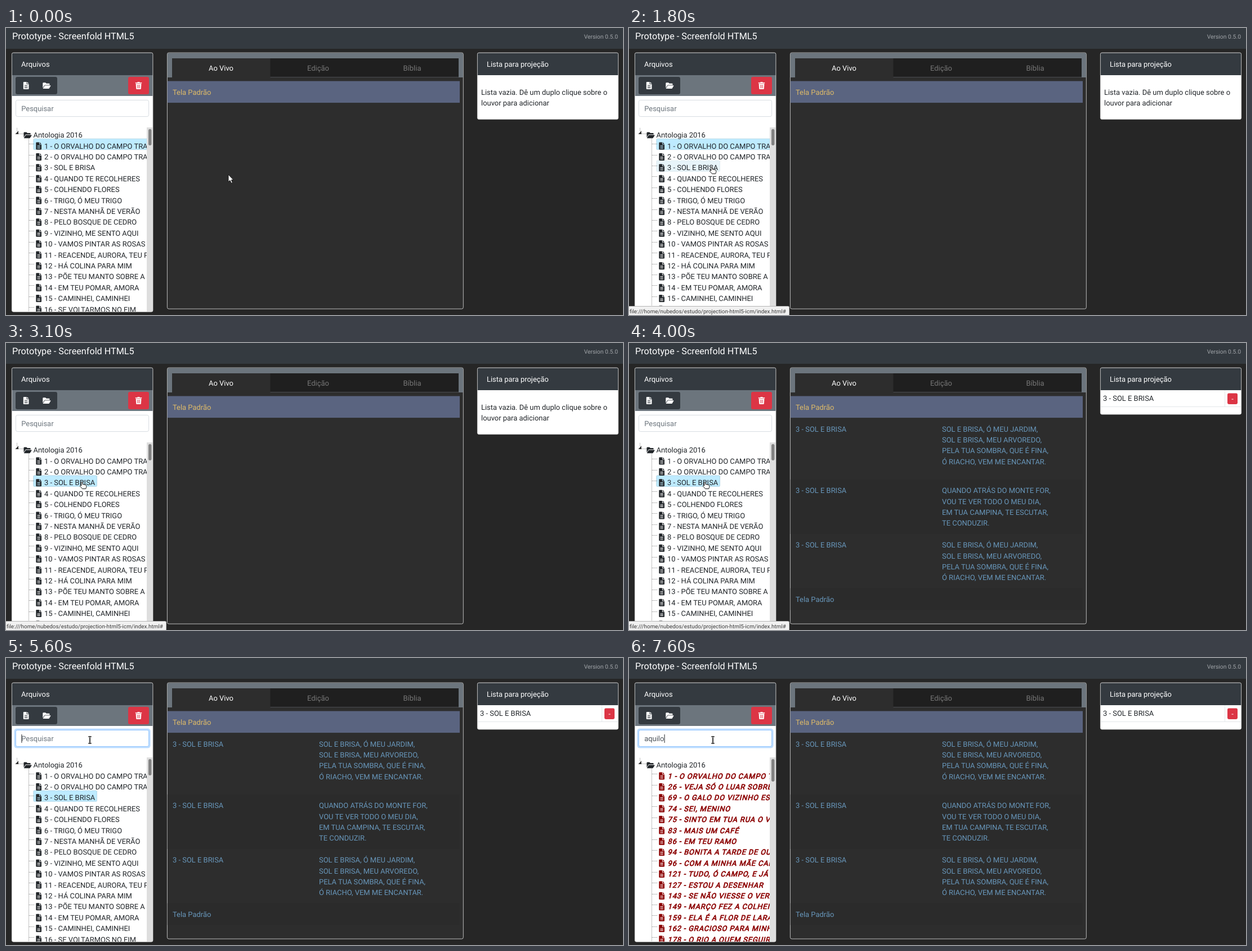
Recreate the animation shown at these times as an HTML page. Size 1096 by 511 pixels, loop 8 s.

```html
<!DOCTYPE html>
<html lang="pt">
<head>
<meta charset="utf-8">
<title>Prototype</title>
<style>
  html, body { margin: 0; width: 100%; height: 100%; overflow: hidden; background: #262626; }
  svg { display: block; width: 1096px; height: 511px; font: 12.95px Roboto, sans-serif; }
  text { white-space: pre; text-rendering: geometricPrecision; }
  .found { fill: #8b0000; }
  /* Emboldened, slanted regular face */
  .found text {
    letter-spacing: .81px; stroke: #8b0000; stroke-width: .7px;
    transform: translateX(.4px) skewX(-14deg); transform-box: fill-box; transform-origin: 0 79%;
  }
</style>
</head>
<body>
<svg id="stage" viewBox="0 0 1096 511"></svg>
<script>
const LOOP = 8000, STEP = 100;
const ROW = 19.4, TOP = 197.2, RIGHT = 250;
const INK = '#212529', DARK = '#343a40', GREY = '#6c757d', RED = '#dc3545';
const SONG = '3 - SOL E BRISA';

const SONGS = [
  '1 - O ORVALHO DO CAMPO TRAZ PAZ', '2 - O ORVALHO DO CAMPO TRAZ LUZ', SONG,
  '4 - QUANDO TE RECOLHERES', '5 - COLHENDO FLORES', '6 - TRIGO, Ó MEU TRIGO',
  '7 - NESTA MANHÃ DE VERÃO', '8 - PELO BOSQUE DE CEDRO', '9 - VIZINHO, ME SENTO AQUI',
  '10 - VAMOS PINTAR AS ROSAS', '11 - REACENDE, AURORA, TEU PORTAL', '12 - HÁ COLINA PARA MIM',
  '13 - PÕE TEU MANTO SOBRE A MESA', '14 - EM TEU POMAR, AMORA', '15 - CAMINHEI, CAMINHEI',
  '16 - SE VOLTARMOS NO FIM'
];
const FOUND = [
  '1 - O ORVALHO DO CAMPO TRAZ PAZ', '26 - VEJA SÓ O LUAR SOBRE O RIO', '69 - O GALO DO VIZINHO ESTÁ ALI',
  '74 - SEI, MENINO', '75 - SINTO EM TUA RUA O VENTO', '83 - MAIS UM CAFÉ', '86 - EM TEU RAMO',
  '94 - BONITA A TARDE DE OUTONO', '96 - COM A MINHA MÃE CANTEI', '121 - TUDO, Ó CAMPO, E JÁ',
  '127 - ESTOU A DESENHAR', '143 - SE NÃO VIESSE O VERÃO', '149 - MARÇO FEZ A COLHEITA',
  '159 - ELA É A FLOR DE LARANJEIRA', '162 - GRACIOSO PARA MINHA AVÓ', '178 - O RIO A QUEM SEGUIREI'
];
const CHORUS = ['SOL E BRISA, Ó MEU JARDIM,', 'SOL E BRISA, MEU ARVOREDO,',
  'PELA TUA SOMBRA, QUE É FINA,', 'Ó RIACHO, VEM ME ENCANTAR.'];
const VERSE = ['QUANDO ATRÁS DO MONTE FOR,', 'VOU TE VER TODO O MEU DIA,',
  'EM TUA CAMPINA, TE ESCUTAR,', 'TE CONDUZIR.'];

// Pointer path: time, x, y
const PATH = [
  [700, 395, 261], [1200, 272, 237], [1600, 160, 231], [1800, 147, 247],
  [2600, 147, 247], [3000, 135, 247], [4500, 135, 247], [4900, 150, 124],
  [5100, 150, 142], [5300, 150, 142], [5600, 149, 146]
];
const TYPED = [[0, ''], [6500, 'a'], [6700, 'aq'], [7000, 'aqui'], [7600, 'aquilo']];
const SELECT = 2900, ADDED = 4000, FOCUS = 5400, FILTER = 7600;

const rect = (x, y, w, h, fill, more = '') =>
  `<rect x="${x}" y="${y}" width="${w}" height="${h}" fill="${fill}" ${more}/>`;
// Text placed by the middle of its capitals
const text = (x, mid, str, fill = INK, size = 12.95, more = '') =>
  `<text x="${x}" y="${(mid + size * .356).toFixed(2)}" ${fill && `fill="${fill}"`} font-size="${size}" ${more}>${str}</text>`;
const path = (x, y, d, more = '') => `<path transform="translate(${x} ${y})" d="${d}" ${more}/>`;
const dots = d => `<path d="${d}" stroke="#888" stroke-dasharray="1 1" fill="none"/>`;
const group = (id, body, more = '') => `<g id="${id}" ${more}>${body}</g>`;

const FILE = 'M0 1Q0 0 1 0H5.7V3.3Q5.7 4 6.4 4H9.7V12Q9.7 13 8.7 13H1Q0 13 0 12ZM6.6 0L9.7 3.1H6.6Z' +
  'M2.2 5.8H7.5V6.7H2.2ZM2.2 7.9H7.5V8.8H2.2ZM2.2 10H7.5V10.9H2.2Z';
const FOLDER = 'M0 1.6Q0 .4 1.2.4H4.8L6.4 2H11Q12.2 2 12.2 3.2V4.6H4.2Q3.2 4.6 2.7 5.4L0 10Z' +
  'M.3 11L3.3 6Q3.7 5.4 4.3 5.4H13.6Q14.5 5.4 14.1 6.2L11.4 10.6Q11 11.2 10.4 11.2H.8Q0 11.2.3 11Z';
const TRASH = 'M0 .9H3.4L4 0H7.4L8 .9H11.4V2.4H0ZM.8 3.2H10.6L10 12Q9.9 13 8.9 13H2.5Q1.5 13 1.4 12Z' +
  'M3.2 5V11.2H4V5ZM5.3 5V11.2H6.1V5ZM7.4 5V11.2H8.2V5Z';
const ARROW = 'M0 0V13L3 10.3L5.2 15.3L7.4 14.4L5.3 9.6H9Z';
const HAND = 'M0 0Q1.2 0 1.2 1.3V4.6L6 5.4Q7.7 5.8 7.7 7.4V9.6L6.7 12.6H.6L-3.2 8.2Q-4 7-3 6.5T-1.2 7.2V1.3Q-1.2 0 0 0Z';
const BEAM = 'M-2.6-6H-.8L0-5.3L.8-6H2.6M-2.6 6H-.8L0 5.3L.8 6H2.6M0-5.3V5.3';

const tree = list => list.map((s, i) => {
  const mid = 210 + i * ROW;
  return path(53.3, mid - 6.5, FILE, 'fill-rule="evenodd"') + text(68, mid, s, '');
}).join('');

// Card outline from its outer edges
const card = (x, right, bottom, fill) =>
  rect(x + .4, 44, right - x - .8, bottom - 44.4, fill, 'rx="2.8" stroke="#dfdfdf" stroke-width=".81"');
const head = (x, right, bottom, fill) =>
  `<path d="M${x} ${bottom}V46.4Q${x} 44.4 ${x + 2} 44.4H${right - 2}Q${right} 44.4 ${right} 46.4V${bottom}Z" fill="${fill}"/>`;

const verse = (mid, lines) => text(296, mid, SONG, '#6897bb') +
  lines.map((s, i) => text(556, mid + i * ROW, s, '#6897bb')).join('');

const stage = document.getElementById('stage');
stage.innerHTML =
  '<clipPath id="listClip"><rect x="10.8" y="177" width="239.2" height="328"/></clipPath>' +
  rect(0, 0, 1096, 511, '#262626') +
  rect(0, 0, 1096, 37, DARK) +
  text(11, 14.5, 'Prototype - Screenfold HTML5', '#fff', 16.2) +
  text(1087, 15, 'Version 0.5.0', '#a0a4a8', 10.36, 'text-anchor="end"') +

  // Files
  card(10, 261.3, 505.7, '#fff') + head(10.8, 260.5, 84, DARK) + text(27, 64, 'Arquivos', '#fff') +
  rect(10.8, 84, 249.7, 37, GREY) +
  rect(17, 87, 74, 31, DARK, 'rx="3.2"') + rect(217, 87, 37, 31, RED, 'rx="3.2"') +
  path(30.8, 96, FILE, 'fill="#fff" fill-rule="evenodd"') +
  path(65.3, 96.8, FOLDER, 'fill="#fff"') + path(229.8, 96, TRASH, 'fill="#fff" fill-rule="evenodd"') +
  group('focus', rect(14.4, 125.4, 242.2, 35.2, '#bfdeff', 'rx="5"')) +
  rect(17.4, 128.4, 236.2, 29.2, '#fff', 'id="box" rx="3" stroke="#ced4da" stroke-width=".81"') +
  text(27.2, 143, 'Pesquisar', GREY, 12.95, 'id="hint"') +
  text(27.2, 143, '', '#495057', 12.95, 'id="typed"') +
  rect(0, 136, 1, 15, INK, 'id="caret"') +
  group('list',
    rect(48.8, 0, 0, ROW, '#e7f4f9', 'id="hover" rx="1.6" stroke="#d5e3e8" stroke-width=".6"') +
    rect(48.8, 0, 0, ROW, '#beebff', 'id="pick" rx="1.6" stroke="#a5cbdc" stroke-width=".6"') +
    dots('M19.5 178V184M22 188.5H31M40.5 197V505') +
    dots(SONGS.map((s, i) => `M41 ${Math.floor(206.6 + i * ROW) + .5}H50`).join('')) +
    '<path d="M22 183V189H16.5Z" fill="#333"/>' +
    path(31.5, 185, FOLDER, `fill="${INK}"`) + text(48.5, 190.5, 'Antologia 2016') +
    group('all', tree(SONGS), `fill="${INK}"`) + group('found', tree(FOUND), 'class="found"'),
    'clip-path="url(#listClip)"') +
  rect(250, 177, 10.5, 328, '#dedede') + rect(253, 180, 5.5, 29, '#828282', 'id="thumb" rx="2.7"') +

  // Live view
  card(286, 812.7, 500.5, '#2d2d2d') + head(286.8, 811.9, 88, GREY) +
  rect(295, 54, 175, 34, '#2d2d2d') + rect(469.5, 54, 334.5, 33.3, '#1f1f1f') +
  rect(469.5, 87, 334.5, 1, '#4a4d50') +
  text(382, 71, 'Ao Vivo', '#fff', 12.95, 'text-anchor="middle"') +
  text(554.5, 71, 'Edição', '#777', 12.95, 'text-anchor="middle"') +
  text(721.5, 71, 'Bíblia', '#777', 12.95, 'text-anchor="middle"') +
  rect(286.8, 94.5, 519.2, 38.6, '#5a6480') + text(296, 114, 'Tela Padrão', '#dfbb68') +
  group('lyrics',
    rect(286.8, 243, 519.2, 97, '#2b2b2b') + rect(286.8, 436.6, 519.2, 38.8, '#2b2b2b') +
    verse(153, CHORUS) + verse(262.6, VERSE) + verse(359.6, CHORUS) +
    text(296, 456.4, 'Tela Padrão', '#6897bb')) +

  // Queue
  group('empty', card(837, 1088, 163, '#fff') +
    text(844, 114, 'Lista vazia. Dê um duplo clique sobre o') + text(844, 133.4, 'louvor para adicionar')) +
  group('queue', card(837, 1088, 127.5, '#fff') + text(842, 98, SONG) +
    rect(837.8, 113, 249.4, .81, '#dee2e6') + rect(1058, 84, .81, 29, '#dee2e6') +
    rect(1063, 89.5, 18, 19.5, RED, 'rx="2.4"') + text(1072, 99, '-', '#fff', 12.95, 'text-anchor="middle"')) +
  head(837.8, 1087.2, 84, DARK) + text(854, 64, 'Lista para projeção', '#fff') +

  group('status', rect(-1, 495.5, 285.5, 17, '#f1f1f1', 'rx="2" stroke="#b4b4b4"') +
    text(1, 504, 'file:///home/nubedos/estudo/projection-html5-icm/index.html#', '#3c3c3c', 9.88)) +
  group('cursor',
    path(0, 0, ARROW, 'id="arrow" fill="#fff" stroke="#111" stroke-width=".9"') +
    path(0, 0, HAND, 'id="hand" fill="#fff" stroke="#111"') +
    group('beam', path(0, 0, BEAM, 'fill="none" stroke="#111" stroke-width="2.2"') +
      path(0, 0, BEAM, 'fill="none" stroke="#fff" stroke-width=".5"')));

const $ = id => document.getElementById(id);
const show = (id, on) => $(id).setAttribute('visibility', on ? 'visible' : 'hidden');
const set = (id, attrs) => { for (const k in attrs) $(id).setAttribute(k, attrs[k]); };
const clamp = v => Math.max(0, Math.min(1, v));

const labels = [...$('all').querySelectorAll('text')];
const rowEnd = i => Math.min(RIGHT + 2, 71.2 + labels[i].getComputedTextLength());

function pointer(t) {
  let a = PATH[0];
  for (const b of PATH) {
    if (t < b[0]) {
      const k = b === a ? 0 : clamp((t - a[0]) / (b[0] - a[0]));
      return [a[1] + (b[1] - a[1]) * k, a[2] + (b[2] - a[2]) * k];
    }
    a = b;
  }
  return [a[1], a[2]];
}

function mark(id, i) {
  show(id, i >= 0);
  if (i >= 0) set(id, { y: TOP + i * ROW, width: rowEnd(i) - 48.8 });
}

function draw(now) {
  const t = Math.floor(now % LOOP / STEP) * STEP;
  const [x, y] = pointer(t);
  let over = Math.floor((y - TOP) / ROW);
  if (over < 0 || x > RIGHT || x > rowEnd(over)) over = -1;
  const inBox = x < 254 && y > 128 && y < 158;
  const filtered = t >= FILTER;

  mark('hover', over);
  mark('pick', filtered ? -1 : t < SELECT ? 0 : 2);
  show('all', !filtered);
  show('found', filtered);
  set('thumb', { height: filtered ? 40 : 29 });

  show('lyrics', t >= ADDED);
  show('queue', t >= ADDED);
  show('empty', t < ADDED);

  const focused = t >= FOCUS;
  const word = TYPED.filter(s => s[0] <= t).pop()[1];
  show('focus', focused);
  set('focus', { opacity: clamp((t - FOCUS + 100) / 300) });
  set('box', { stroke: focused ? '#80bdff' : '#ced4da' });
  show('hint', !word);
  $('typed').textContent = word;
  show('caret', focused);
  set('caret', { x: 27.4 + (word ? $('typed').getComputedTextLength() : 0) });

  const fade = t < 3000 ? clamp((t - 1200) / 300) : clamp((5200 - t) / 400) ** 1.5;
  set('status', { opacity: fade });

  set('cursor', { transform: `translate(${x} ${y})` });
  show('hand', over >= 0);
  show('beam', inBox);
  show('arrow', over < 0 && !inBox);
}

const start = performance.now();
function tick() {
  draw(performance.now() - start);
  requestAnimationFrame(tick);
}
tick();
</script>
</body>
</html>
```
